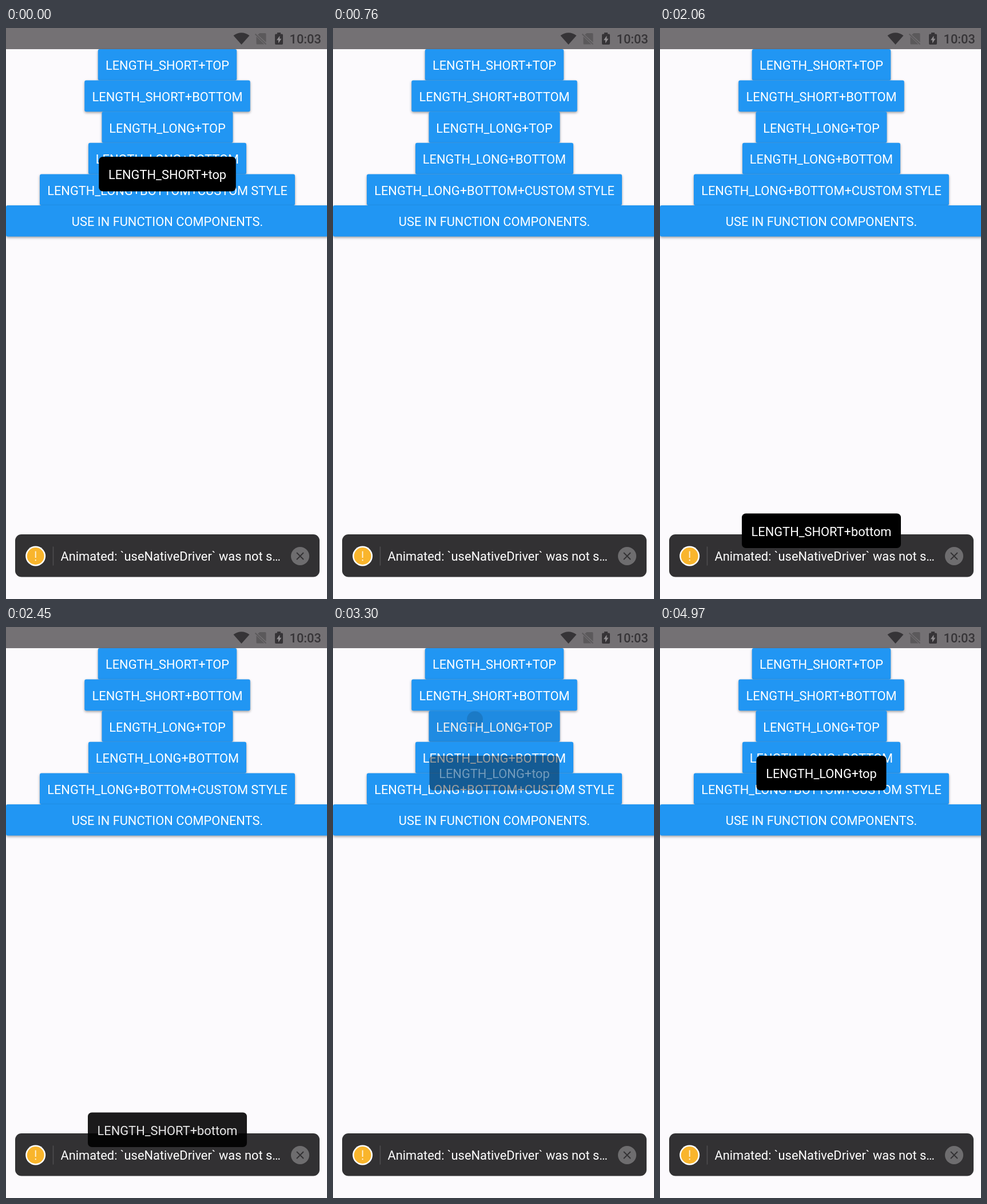
Animation, 561 px wide and 998 px high, one loop 5 s. Source, as an HTML page:

```html
<!DOCTYPE html>
<html lang="en">
<head>
<meta charset="utf-8">
<title>Toast demo</title>
<style>
  html, body { margin: 0; width: 100%; height: 100%; overflow: hidden; background: #fcfafd; }
  svg { display: block; width: 100%; height: 100%; }
  text { font: 400 21.84px Roboto, sans-serif; fill: #fff; }
  .mid { text-anchor: middle; }
  .button { fill: #2196f3; filter: drop-shadow(0 2px 2px rgba(0, 0, 0, .36)); }
</style>
</head>
<body>
<svg viewBox="0 0 561 998">
  <rect id="page" width="561" height="998"/>
  <rect id="status" width="561" height="37"/>
  <g fill="#363437">
    <path d="M397.5 13.2Q411.5 3.5 425.5 13.2L411.5 29Z"/>
    <path d="M474 8h6v2.4h2.2q1.8 0 1.8 1.8v15q0 1.8-1.8 1.8h-10.4q-1.8 0-1.8-1.8v-15q0-1.8 1.8-1.8h2.2Z"/>
    <path d="M478.4 13.5v5.2h3l-5.4 8v-5.5h-3Z" fill="#8f8c8f"/>
    <text x="495.5" y="27" style="fill:#363437;font-weight:500">10:03</text>
  </g>
  <path d="M443.5 9h9.5q1.5 0 1.5 1.5v14.5L440 11.8ZM437.5 15l14 13.5h-12.500q-1.500 0-1.500-1.500Z" fill="#5b595b"/>
  <path d="M435.5 10.500l19 18" stroke="#5b595b" stroke-width="1.8"/>
  <g id="buttons"></g>
  <g id="ripples"></g>
  <g id="warning">
    <rect id="bar" x="16" y="885" width="532" height="74.500" rx="11"/>
    <circle cx="51.700" cy="923" r="17.500" fill="#fff"/>
    <circle cx="51.700" cy="923" r="15" fill="#f9b52c"/>
    <path d="M51.700 914.500v11.500M51.700 929v2.300" stroke="#fff3d8" stroke-width="1.900"/>
    <path d="M82.500 906.500v33" stroke="#4e4d4f" stroke-width="1.600"/>
    <text x="95.500" y="931">Animated: `useNativeDriver` was not s…</text>
    <circle cx="514" cy="923" r="16" fill="#6e6d6f"/>
    <path d="M508 917l12 12M520 917l-12 12" stroke="#323133" stroke-width="1.900"/>
  </g>
  <g id="toasts"></g>
</svg>
<script>
const LOOP = 5000, CENTER = 282, ROW = 54.6, TOP = 37;
const byId = id => document.getElementById(id);

function add(parent, tag, attrs, content) {
  const node = document.createElementNS('http://www.w3.org/2000/svg', tag);
  for (const key in attrs) node.setAttribute(key, attrs[key]);
  if (content) node.textContent = content;
  parent.append(node);
  return node;
}

const box = (parent, y, width, height, rx, attrs) =>
  add(parent, 'rect', { x: CENTER - width / 2, y, width, height, rx, ...attrs });

const label = (parent, y, content) =>
  add(parent, 'text', { x: CENTER, y, class: 'mid' }, content);

const buttons = [
  ['LENGTH_SHORT+TOP', 242.5],
  ['LENGTH_SHORT+BOTTOM', 289.5],
  ['LENGTH_LONG+TOP', 229],
  ['LENGTH_LONG+BOTTOM', 276],
  ['LENGTH_LONG+BOTTOM+CUSTOM STYLE', 446],
  ['USE IN FUNCTION COMPONENTS.', 564]
];
buttons.forEach(([name, width], i) => {
  box(byId('buttons'), TOP + i * ROW, width, ROW, 3, { class: 'button' });
  label(byId('buttons'), 73.4 + i * ROW, name);
});

// Times are fade-in start and fade-out start; each fade lasts FADE.
const FADE = 500;
const toasts = [
  { name: 'LENGTH_SHORT+top', y: 225, width: 239.5, show: -1000, hide: 210 },
  { name: 'LENGTH_SHORT+bottom', y: 848.5, width: 278, show: 1165, hide: 2335 },
  { name: 'LENGTH_LONG+top', y: 225, width: 227, show: 3080, hide: LOOP }
];
for (const toast of toasts) {
  toast.group = add(byId('toasts'), 'g', {});
  toast.parts = [
    box(toast.group, toast.y, toast.width, 60.5, 7, {}),
    label(toast.group, toast.y + 39.3, toast.name)
  ];
}

const presses = [{ row: 1, start: 1140 }, { row: 2, start: 3055 }];
for (const press of presses) {
  const y = TOP + press.row * ROW;
  press.group = add(byId('ripples'), 'g', {});
  box(press.group, y, buttons[press.row][1], ROW, 3, { 'fill-opacity': .07 });
  add(press.group, 'circle', { cx: 248, cy: y + 15, r: 14, 'fill-opacity': .12 });
}

const clamp = v => Math.min(1, Math.max(0, v));
const ease = v => {
  v = clamp(v);
  return v < .5 ? 2 * v * v : 1 - 2 * (1 - v) ** 2;
};

function render(t) {
  const tinted = t >= 210 && t < 710;
  byId('page').setAttribute('fill', tinted ? '#f8faf8' : '#fcfafd');
  byId('status').setAttribute('fill', tinted ? '#747474' : '#747174');
  byId('bar').setAttribute('fill', tinted ? '#30302e' : '#323133');

  for (const { show, hide, group, parts } of toasts) {
    const alpha = ease((t - show) / FADE) * (1 - ease((t - hide) / FADE));
    group.setAttribute('display', alpha > 0 ? 'inline' : 'none');
    for (const part of parts) part.setAttribute('opacity', alpha);
  }
  for (const { start, group } of presses) {
    const alpha = clamp((t - start) / 90) * clamp((start + 450 - t) / 190);
    group.setAttribute('opacity', alpha);
  }
}

const begin = performance.now();
function tick() {
  render((performance.now() - begin) % LOOP);
  requestAnimationFrame(tick);
}
render(0);
requestAnimationFrame(tick);
</script>
</body>
</html>
```
